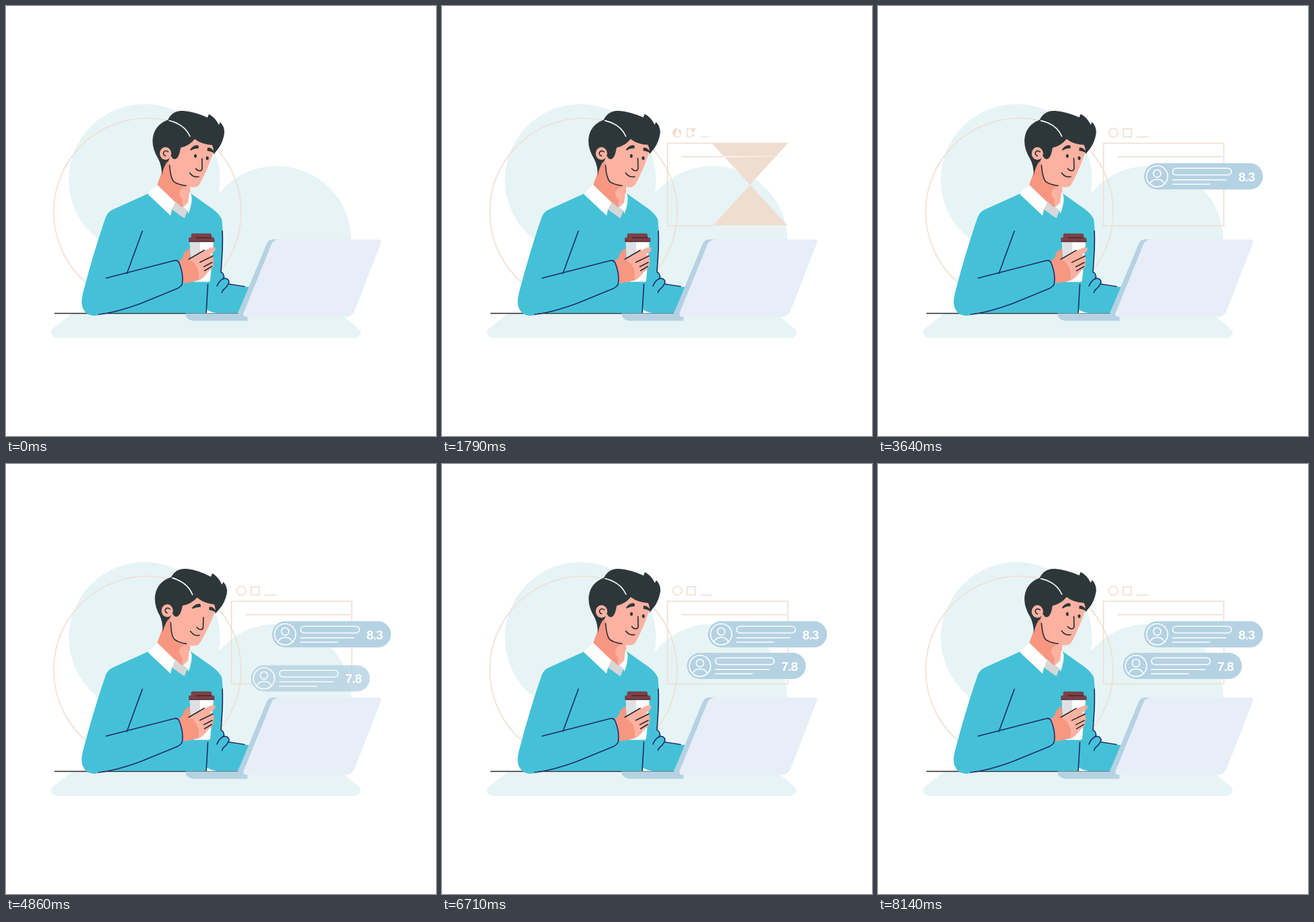
An HTML page for the animation above (8.21 s loop, 640 px wide and 640 px high).

```html
<!DOCTYPE html>
<html lang="en">
<head>
<meta charset="utf-8">
<title>Working with coffee</title>
<style>
  html, body { margin: 0; width: 100%; height: 100%; overflow: hidden; background: #fff; }
  svg { display: block; width: 100vw; height: 100vh; }
  .line { fill: none; stroke-linecap: round; stroke-linejoin: round; stroke-width: 1.6; }
  .navy { stroke: #1d2c66; }
  .ink { stroke: #2b2a2e; }
  .white { stroke: #fff; }
  .pale { fill: #e7f4f5; }
  .blue { fill: #b5d2e3; }
  .teal { fill: #45c1d7; }
  .skin { fill: #fcb1a1; }
  .shade { fill: #f79782; }
  .hair { fill: #2d3739; }
  .score { font: bold 19px "Liberation Sans", Arial, sans-serif; letter-spacing: -.8px; fill: #fff; text-anchor: middle; }
</style>
</head>
<body>
<svg viewBox="0 0 640 640">
  <defs>
    <g id="card">
      <rect class="blue" x="396" y="234" width="177" height="39" rx="19.5"/>
      <g class="line white">
        <circle cx="415.5" cy="253.5" r="15.8"/>
        <circle cx="415.5" cy="249.3" r="5.6"/>
        <path d="M404.3 265A12.5 12.5 0 0 1 426.7 265"/>
        <rect x="438.5" y="241.5" width="87.5" height="10" rx="5"/>
        <path d="M438.5 258.8H518M438.5 265.2H493.5"/>
      </g>
    </g>
  </defs>

  <!-- backdrop and desk -->
  <g class="pale">
    <circle cx="206" cy="258.5" r="112.5"/>
    <circle cx="403" cy="349" r="111"/>
    <path d="M98 458L70 480Q66 483 67 487Q69 494 76 494H519Q527 493 528 486Q527 482 522 478L503 462V458Z"/>
  </g>
  <circle cx="210.5" cy="306.5" r="139.5" fill="none" stroke="#f0dfd2" stroke-width="1.6"/>
  <path d="M72.5 457.5H350" class="line ink" style="stroke-width:1.3"/>

  <path id="frame" fill="#efddd0" fill-rule="evenodd"/>

  <g id="card1">
    <use href="#card"/>
    <text class="score" x="548.5" y="260.5">8.3</text>
  </g>
  <g id="card2">
    <use href="#card" x="-31.5" y="47"/>
    <text class="score" x="517" y="307.5">7.8</text>
  </g>

  <!-- jumper -->
  <path class="teal" d="M212 279L160 302.5Q151.5 306 148.5 314Q131 364 114.5 427Q111 441 114 449Q119 461 131 461Q138 461 145 457H345L364 418.5Q340 417 333 414Q331 407 325 403L320 396Q323 365 323 340L321.5 319Q319 309 299 296L275 279L262 312Z"/>
  <path fill="#fff" d="M298 451Q304 456 314 457H298Z"/>

  <!-- neck and collar -->
  <path class="shade" d="M240 226L225 266L228 273L263 301L274 290V262Z"/>
  <path class="skin" d="M274 268Q259 269 258 278Q258 284 263 289L262 300L272 291Z"/>
  <path fill="#d6d7d8" d="M247 303L252 291L262 300L272 291L270 305L265.5 316Z"/>
  <path fill="#fff" d="M225 266L211 280L245 312Q246 303 252 292ZM273 277L276 282Q278 292 271.5 309Q270 302 264 300L271 293Z"/>

  <!-- head -->
  <g id="head">
    <path class="skin" d="M240 205L243 238Q244 259 251 263Q262 269 274 269.5Q284 271 287.5 266Q290 263 300 241L310 215L306 198L260 188Z"/>
    <path class="hair" d="M232 252Q232 238 227 228Q217 212 218.5 197Q221 177 241 169.5Q248 155 264 156Q280 157 300 166L302 161Q311 165 317 177L319 173Q326 180 325 190Q323 202 317 211L309 221Q310 214 307 207Q291 206 281 198Q273 208 260 211Q258 225 253 227.5Q248 229 246.5 224L244 224Q243 231 239 233Q234 241 232 252Z"/>
    <ellipse class="skin" cx="237.5" cy="219.5" rx="8.6" ry="9.5"/>
    <path class="line white" d="M243 170.5Q266 176 274 194"/>
    <path class="hair" d="M274 214Q278 207 285 207Q288 208 286.5 212Q281 211.5 275 215ZM300 211Q307 210 311 219.5Q305 216 299.5 215.5Z"/>
    <g class="line ink">
      <path d="M241.5 217Q237 213.5 234.5 218Q234 222 237.5 223"/>
      <path d="M243.5 237Q245 257 250 261.5Q256 266 268 267.5"/>
      <path d="M291.7 227L292 242Q291 246 287.5 245.3Q284 244.5 282.5 242"/>
      <path d="M273.5 248.5Q279 256 287 254"/>
    </g>
    <g class="hair">
      <ellipse class="eye" cx="282" cy="223.3" rx="2"/>
      <ellipse class="eye" cx="299.7" cy="226.6" rx="2"/>
    </g>
  </g>

  <!-- cup and hand -->
  <g id="cup">
    <path fill="#fff" d="M273.5 350H309L304 408Q303.7 410.5 301 410.5H280Q277 410.5 276.8 408Z"/>
    <path fill="#dfe0e1" d="M273.5 350H289L289 372L276 384Z"/>
    <path fill="#7c4047" d="M277 338.5H304Q306 338.5 306 341V344.5H309Q310.5 345 310.5 350.5H272Q271.5 345 273 344.5H275.5V341Q275.5 338.5 277 338.5Z"/>
    <path class="line" stroke="#3f2128" style="stroke-width:1.2" d="M283 344.8H306M273 350.6H309.5"/>
    <path class="shade" d="M255 380Q262 378 264 371Q265 364 274 361L274 378L290 384L287 408Q275 412 262 413Z"/>
    <path class="skin" d="M271 378Q288 367 304 360Q311 357.5 312 361.5Q311 366 303 370Q310 370 309 376Q310 381 308 383Q310 387 306 391Q301 395 298 399Q294 405 286 409Q289 394 282 385Q278 379 271 378Z"/>
    <path class="line ink" d="M272 377L295 363.5M288.5 381.5L308 372M294.5 388L307 381.5M295.5 394L306.5 387.5"/>
  </g>

  <!-- cuff and folds -->
  <path class="teal" d="M230 385L250 379Q256 377.5 258 383Q264 398 262.5 412Q262 417 255 420L235 427Z"/>
  <g class="line navy">
    <path d="M203 335L180 398"/>
    <path d="M149 405L250 379Q256 377.5 258 383Q264 398 262.5 412Q262 417 255 420.5L200 443Q161 457 138 459"/>
    <path d="M300.5 414L298 456.5"/>
    <path d="M322 335Q323 352 321 380L320 396Q324 398 324.5 403L323 406"/>
    <path d="M314 417Q317 409 323 406Q331 404 332 411Q330 417 325 421Q322 423 321.5 426.5M332.5 414L355 417.5"/>
  </g>

  <!-- laptop -->
  <path class="blue" d="M267 457.5H345L388 354Q391 347.5 397 347.5H406L366 457.5L359.5 460V468.5H278Q268 467.5 267 457.5Z"/>
  <path fill="#e8eef7" d="M408 347.5H555Q560 348 558 353L519 453Q515 462.5 506 462.5H357Q352 462 354 456L395 355Q398 347.5 408 347.5Z"/>
</svg>
<script>
const LOOP = 8210, STEPS = 115, BEAT = 2235;
const $ = id => document.getElementById(id);
const eyes = document.querySelectorAll('.eye');

const ramp = (t, from, to) => Math.min(1, Math.max(0, (t - from) / (to - from)));
const smooth = x => x * x * (3 - 2 * x);
const swell = x => Math.sin(Math.PI * x) ** 2;

// First part p of a closed outline, filled across its open end.
function trim(pts, p) {
  const ring = [...pts, pts[0]];
  const dist = i => Math.hypot(ring[i + 1][0] - ring[i][0], ring[i + 1][1] - ring[i][1]);
  let left = p * pts.reduce((sum, _, i) => sum + dist(i), 0);
  const out = [ring[0]];
  for (let i = 0; i < pts.length && left > 0; i++) {
    const k = Math.min(1, left / dist(i));
    out.push([0, 1].map(a => ring[i][a] + (ring[i + 1][a] - ring[i][a]) * k));
    left -= dist(i);
  }
  return 'M' + out.map(q => q.map(v => v.toFixed(2)).join(' ')).join('L') + 'Z';
}

const bar = (x, y, r, b) => [[r, y], [x, y], [x, b], [r, b]];
const arc = (cx, cy, r, dir) => Array.from({ length: 48 }, (_, i) => {
  const a = i / 48 * 2 * Math.PI;
  return [cx + dir * r * Math.sin(a), cy - r * Math.cos(a)];
});
// A box is an outer edge from the top right and an inner edge from the bottom right.
const box = (x, y, r, b, w) => [bar(x, y, r, b), bar(x + w, b - w, r - w, y + w)];

const outlines = [
  ...box(334.8, 203.5, 515.5, 328, 1.6),
  ...box(364.2, 182, 377.8, 195.6, 1.5),
  arc(350.3, 188.7, 7.3, -1), arc(350.3, 188.7, 5.8, 1),
  bar(356.5, 223.6, 515, 225.2),
  bar(385, 194.2, 402, 195.7)
];

function showCard(id, k) {
  $(id).setAttribute('opacity', k);
  $(id).setAttribute('transform', `translate(0 ${93 * (1 - k)})`);
}

function draw(t) {
  const c = (t + 75) % BEAT;
  const p = ramp(t, -40, 2950);
  $('frame').setAttribute('d', outlines.map(o => trim(o, p)).join(''));

  showCard('card1', smooth(ramp(t, 2570, 3490)));
  showCard('card2', smooth(ramp(t, 4430, 5025)));

  const nod = -0.25 + 2.8 * swell(ramp(c, 0, 900));
  $('head').setAttribute('transform', `rotate(${nod} 265 275)`);
  const open = 1 - smooth(ramp(c, 70, 380)) + smooth(ramp(c, 560, 1000));
  eyes.forEach(e => e.setAttribute('ry', 2.8 * open));

  const tilt = 1.6 * swell(ramp(c, 420, 1640));
  $('cup').setAttribute('transform', `rotate(${tilt} 257 390)`);
}

const start = performance.now();
function tick() {
  const t = (performance.now() - start) % LOOP;
  draw(Math.floor(t / LOOP * STEPS) * LOOP / STEPS);
  requestAnimationFrame(tick);
}
tick();
</script>
</body>
</html>
```
